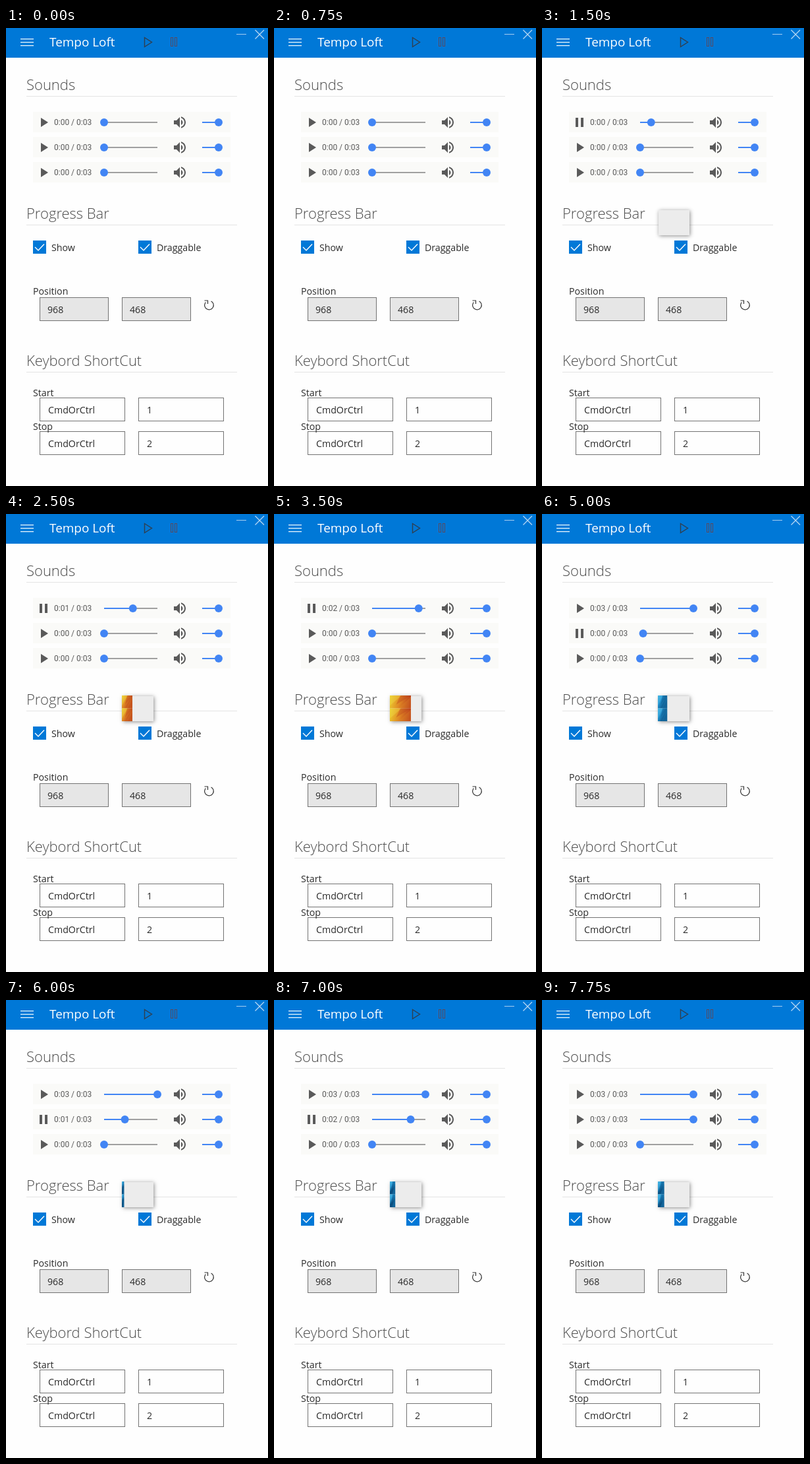
An HTML page with a canvas for the animation above (8000 ms loop, 398 px wide and 694 px high).

```html
<!DOCTYPE html>
<html lang="en">
<head>
<meta charset="utf-8">
<title>Tempo Loft</title>
<style>
  html, body { margin: 0; width: 100%; height: 100%; overflow: hidden; background: #fefefe; }
  canvas { display: block; width: 398px; height: 694px; }
</style>
</head>
<body>
<canvas id="stage"></canvas>
<script>
const W = 398, H = 694, LOOP = 8000, STEP = 250;
const BLUE = '#0078d7', KNOB = '#4285f4', DARK = '#5a5a5a';
const canvas = document.getElementById('stage');
const dpr = window.devicePixelRatio || 1;
canvas.width = W * dpr;
canvas.height = H * dpr;
const ctx = canvas.getContext('2d');

const SANS = '"Open Sans", "Noto Sans", sans-serif';
const BODY = `14.2px ${SANS}`;
const speaker = new Path2D('M3 9v6h4l5 5V4L7 9H3zm13.5 3c0-1.77-1.02-3.29-2.5-4.03v8.05' +
  'c1.48-.73 2.5-2.25 2.5-4.02zM14 3.23v2.06c2.89.86 5 3.54 5 6.71s-2.11 5.85-5 6.71v2.06' +
  'c4.01-.91 7-4.49 7-8.77s-2.99-7.86-7-8.77z');

const sounds = [
  { y: 143, start: 880, end: 3900 },
  { y: 181, start: 4830, end: 7730 },
  { y: 219, start: Infinity, end: Infinity }
];
const WARM = ['#ecd02f', '#e08a24', '#b83a1c', '#f2e04a'];
const COOL = ['#3aaee0', '#1f8cc8', '#0b4f80', '#5cc6ee'];

function rect(x, y, w, h, color) {
  ctx.fillStyle = color;
  ctx.fillRect(x, y, w, h);
}

function text(str, x, y, font = BODY, color = '#2b2b2b') {
  ctx.font = font;
  ctx.fillStyle = color;
  ctx.fillText(str, x, y);
}

function poly(points, color) {
  ctx.beginPath();
  points.forEach(([x, y]) => ctx.lineTo(x, y));
  ctx.closePath();
  ctx.fillStyle = color;
  ctx.fill();
}

function stroke(points, color, width = 1, close = false) {
  ctx.beginPath();
  points.forEach(([x, y]) => ctx.lineTo(x, y));
  if (close) ctx.closePath();
  ctx.strokeStyle = color;
  ctx.lineWidth = width;
  ctx.stroke();
}

function dot(x, y, r, color) {
  ctx.beginPath();
  ctx.arc(x, y, r, 0, Math.PI * 2);
  ctx.fillStyle = color;
  ctx.fill();
}

function header() {
  rect(0, 0, W, 45, BLUE);
  for (const y of [16, 21, 26]) rect(22, y, 20, 1.3, '#e8f3fc');
  text('Tempo Loft', 66, 28, `18.9px ${SANS}`, '#fff');
  stroke([[210.5, 14.5], [221.5, 21.5], [210.5, 28.5]], '#2f3f50', 1.4, true);
  ctx.strokeStyle = '#5a4a60';
  ctx.lineWidth = 1;
  ctx.strokeRect(250.5, 14.5, 3, 13);
  ctx.strokeRect(256.5, 14.5, 3, 13);
  rect(350, 9, 15, 1, '#a5cdf0');
  stroke([[378.5, 3], [392, 16.5]], '#b5d6f3', 1.2);
  stroke([[392, 3], [378.5, 16.5]], '#b5d6f3', 1.2);
}

function heading(str, y) {
  text(str, 31, y, `300 22px ${SANS}`, '#4c4c4c');
  rect(31, y + 9, 320, 1, '#e4e4e4');
}

function audioRow({ y, start, end }, t) {
  const playing = t >= start && t < end;
  const done = t >= end;
  const pos = done ? 81 : playing ? Math.min(81, (t - start) * 0.027) : 0;
  const secs = done ? 3 : playing ? Math.floor((t - start) / 1000) : 0;
  rect(41, y - 16, 300, 31, '#fafaf8');
  if (playing) {
    rect(51, y - 7, 4, 14, DARK);
    rect(59, y - 7, 4, 14, DARK);
  } else {
    poly([[53, y - 7], [64, y], [53, y + 7]], DARK);
  }
  text(`0:0${secs} / 0:03`, 73, y + 4, '12px Roboto, Arial, sans-serif', DARK);
  rect(149, y - 1, 81, 2, '#a0a0a0');
  rect(149, y - 1, pos, 2, KNOB);
  dot(149 + pos, y, 6, KNOB);
  ctx.save();
  ctx.translate(252, y - 12);
  ctx.fillStyle = DARK;
  ctx.fill(speaker);
  ctx.restore();
  rect(298, y - 1, 25, 2, KNOB);
  dot(323, y, 6, KNOB);
}

function checkbox(x, label) {
  rect(x, 322, 20, 20, BLUE);
  stroke([[x + 3, 332], [x + 8, 337], [x + 17, 327.5]], '#fff', 1.4);
  text(label, x + 28, 338);
}

function field(x, y, w, str, pad, fill) {
  rect(x, y, w, 36, fill);
  ctx.strokeStyle = '#737373';
  ctx.lineWidth = 1;
  ctx.strokeRect(x + 0.5, y + 0.5, w - 1, 35);
  text(str, x + pad, y + 24);
}

function resetIcon() {
  ctx.beginPath();
  ctx.arc(308.5, 420, 6.8, -1.1, 3.85);
  ctx.strokeStyle = '#333';
  ctx.lineWidth = 1.2;
  ctx.stroke();
  stroke([[301.5, 413], [306.5, 413], [306.5, 418]], '#333', 1.2);
}

// Progress moves once a second, each move eased over 400 ms.
function ease(p) {
  p = Math.max(0, Math.min(1, p));
  return 1 - Math.pow(1 - p, 2.2);
}

function barWidth(t) {
  const cool = t >= sounds[1].start;
  const since = t - (cool ? sounds[1].start : sounds[0].start);
  const tick = Math.floor(since / 1000);
  const size = cool ? 4.8 : 16;
  const to = Math.min(48, tick * size);
  const from = tick > 0 ? Math.min(48, (tick - 1) * size) : cool ? 48 : 0;
  return from + (to - from) * ease((since - tick * 1000) / 400);
}

function tile(x, y, w, h, [light, mid, deep, glow]) {
  const g = ctx.createLinearGradient(x, y, x + w, y + h * 0.4);
  g.addColorStop(0, light);
  g.addColorStop(0.5, mid);
  g.addColorStop(1, deep);
  rect(x, y, w, h, g);
  ctx.globalAlpha = 0.35;
  poly([[x, y], [x + w * 0.55, y], [x, y + h * 0.8]], glow);
  poly([[x + w, y + h * 0.1], [x + w, y + h], [x + w * 0.4, y + h]], mid);
  poly([[x + w * 0.5, y], [x + w, y], [x + w * 0.3, y + h * 0.7]], deep);
  ctx.globalAlpha = 1;
}

function popup(t) {
  if (t < sounds[0].start) return;
  ctx.save();
  ctx.shadowColor = 'rgba(0,0,0,.45)';
  ctx.shadowBlur = 6 * dpr;
  ctx.shadowOffsetX = ctx.shadowOffsetY = dpr;
  rect(177, 276, 47, 38, '#ececec');
  ctx.restore();
  const w = barWidth(t);
  if (w < 0.3) return;
  const colors = t >= sounds[1].start ? COOL : WARM;
  tile(176, 275, w, 19.5, colors);
  tile(176, 294.5, w, 19.5, colors);
}

function draw(t) {
  ctx.setTransform(dpr, 0, 0, dpr, 0, 0);
  rect(0, 0, W, H, '#fefefe');
  header();
  heading('Sounds', 94);
  sounds.forEach(s => audioRow(s, t));
  heading('Progress Bar', 289);
  checkbox(41, 'Show');
  checkbox(201, 'Draggable');
  field(51, 408, 105, '968', 12, '#e6e6e6');
  field(176, 408, 105, '468', 12, '#e6e6e6');
  text('Position', 41, 404);
  resetIcon();
  heading('Keybord ShortCut', 512);
  [['Start', '1', 560], ['Stop', '2', 611]].forEach(([label, key, y]) => {
    field(51, y, 130, 'CmdOrCtrl', 13, '#fefefe');
    field(201, y, 130, key, 13, '#fefefe');
    text(label, 41, y - 2);
  });
  popup(t);
}

const begin = performance.now();
function frame() {
  const t = (performance.now() - begin) % LOOP;
  draw(Math.floor(t / STEP) * STEP);
  requestAnimationFrame(frame);
}
frame();
</script>
</body>
</html>
```
